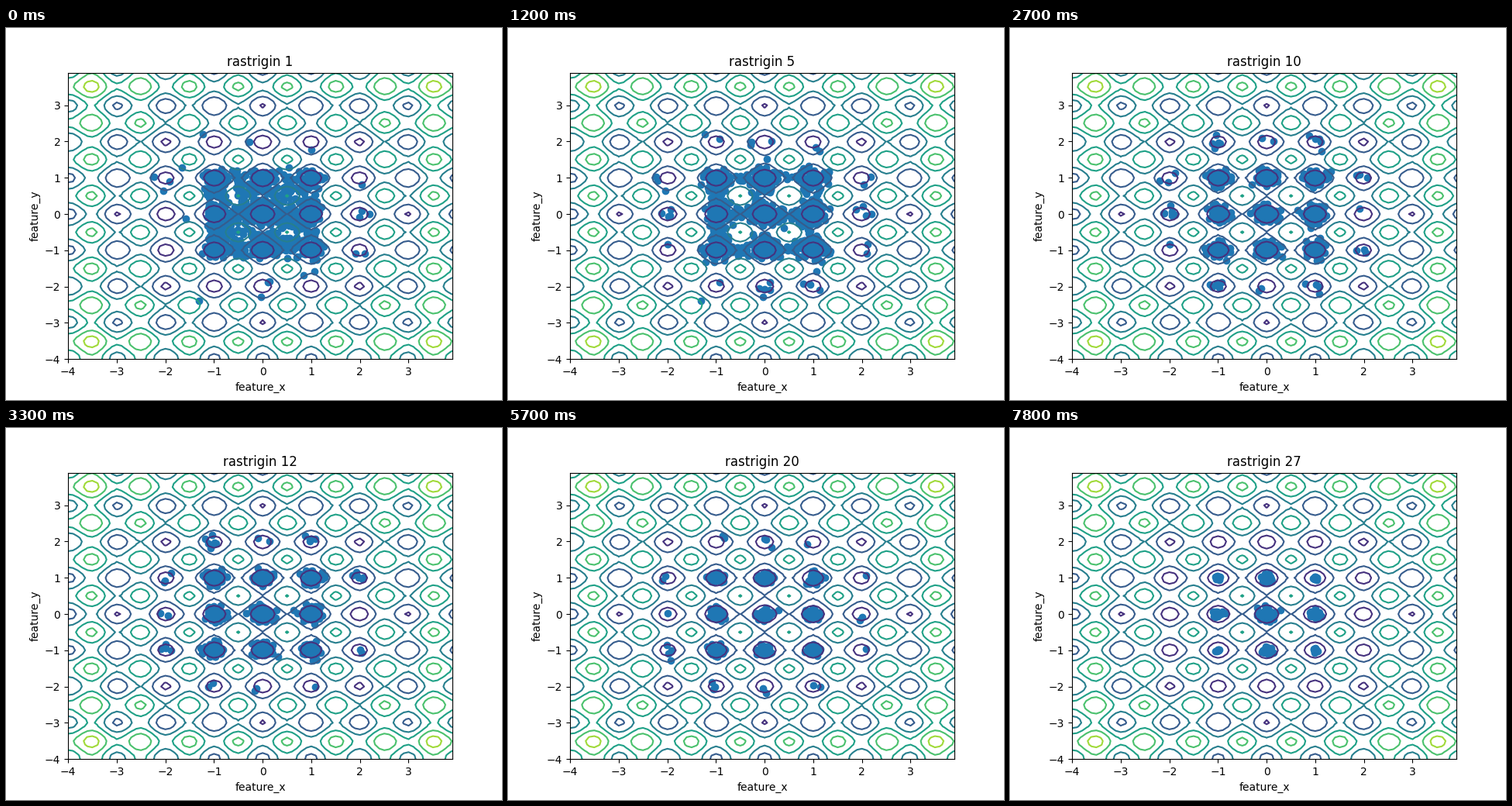
Recreate the animation shown at these times as a matplotlib script. Size 640 px wide and 480 px high, loop 8000 ms.

```python
import numpy as np
import matplotlib.pyplot as plt
from matplotlib.animation import FuncAnimation

FRAMES, INTERVAL, FRAMES_PER_GEN = 80, 100, 3
rng = np.random.default_rng(7)


def basin(x, y):
    """Cosine part of the function: 0 at a local minimum, 40 at a peak."""
    return 10 * (2 - np.cos(2 * np.pi * x) - np.cos(2 * np.pi * y))


def make_field(count=620):
    """Initial square cloud; costly points near the peaks die first."""
    points = rng.uniform(-1, 1, (count, 2)) * [1.15, 1.18]
    points += rng.normal(0, 0.04, points.shape)
    return points, basin(*points.T) * rng.lognormal(0, 0.2, count)


def make_core(cx, cy, count=80):
    """Disc around an inner minimum; far points die first."""
    r = 0.42 * rng.uniform(0, 1, count)
    a = rng.uniform(0, 2 * np.pi, count)
    points = np.column_stack([cx + r * np.cos(a), cy + r * np.sin(a)])
    return points, r * rng.lognormal(0, 0.16, count), abs(cx) + abs(cy)


def make_outer(cx, cy, count=11):
    """A few short-lived points around an outer minimum."""
    birth = rng.uniform(-3, 18, count)
    death = birth + rng.uniform(3, 9, count)
    spread = 0.09 + 0.12 * np.exp(-np.clip(birth, 0, None) / 3)
    points = [cx, cy] + rng.normal(0, 1, (count, 2)) * spread[:, None]
    return points, birth, death


field, field_cost = make_field()
cores = [make_core(cx, cy) for cx in (-1, 0, 1) for cy in (-1, 0, 1)]
outers = [make_outer(cx, cy) for cx in range(-2, 3) for cy in range(-2, 3)
          if max(abs(cx), abs(cy)) == 2 and abs(cx) != abs(cy)]


def core_radius(gen, distance):
    radius = min(0.2 + 0.03 * gen, 0.35 - 0.008 * gen)
    late = max(0, gen - 20) / 7
    return radius - 0.075 * (distance - 1) * late


def population(gen):
    parts = [field[field_cost < 40 * np.exp(-(gen - 1) / 6.5)]]
    for points, reach, distance in cores:
        parts.append(points[reach < core_radius(gen, distance)])
    for points, birth, death in outers:
        parts.append(points[(birth <= gen) & (gen < death)])
    return np.vstack(parts)


fig, ax = plt.subplots(figsize=(6.4, 4.8), dpi=100)
axis = np.arange(-4, 4, 0.1)
x, y = np.meshgrid(axis, axis)
# The tiny offset keeps minima that equal a level from drawing as specks
ax.contour(x, y, x**2 + y**2 + basin(x, y) + 1e-9)
dots = ax.scatter(*population(1).T, color="C0")
ax.set(xlim=(axis[0], axis[-1]), ylim=(axis[0], axis[-1]),
       xticks=range(-4, 4), yticks=range(-4, 4),
       xlabel="feature_x", ylabel="feature_y")
title = ax.set_title("rastrigin 1")


def update(frame):
    gen = 1 + frame // FRAMES_PER_GEN
    dots.set_offsets(population(gen))
    title.set_text(f"rastrigin {gen}")
    return dots, title


anim = FuncAnimation(fig, update, frames=FRAMES, interval=INTERVAL,
                     repeat=True, repeat_delay=0)
plt.show()
```
